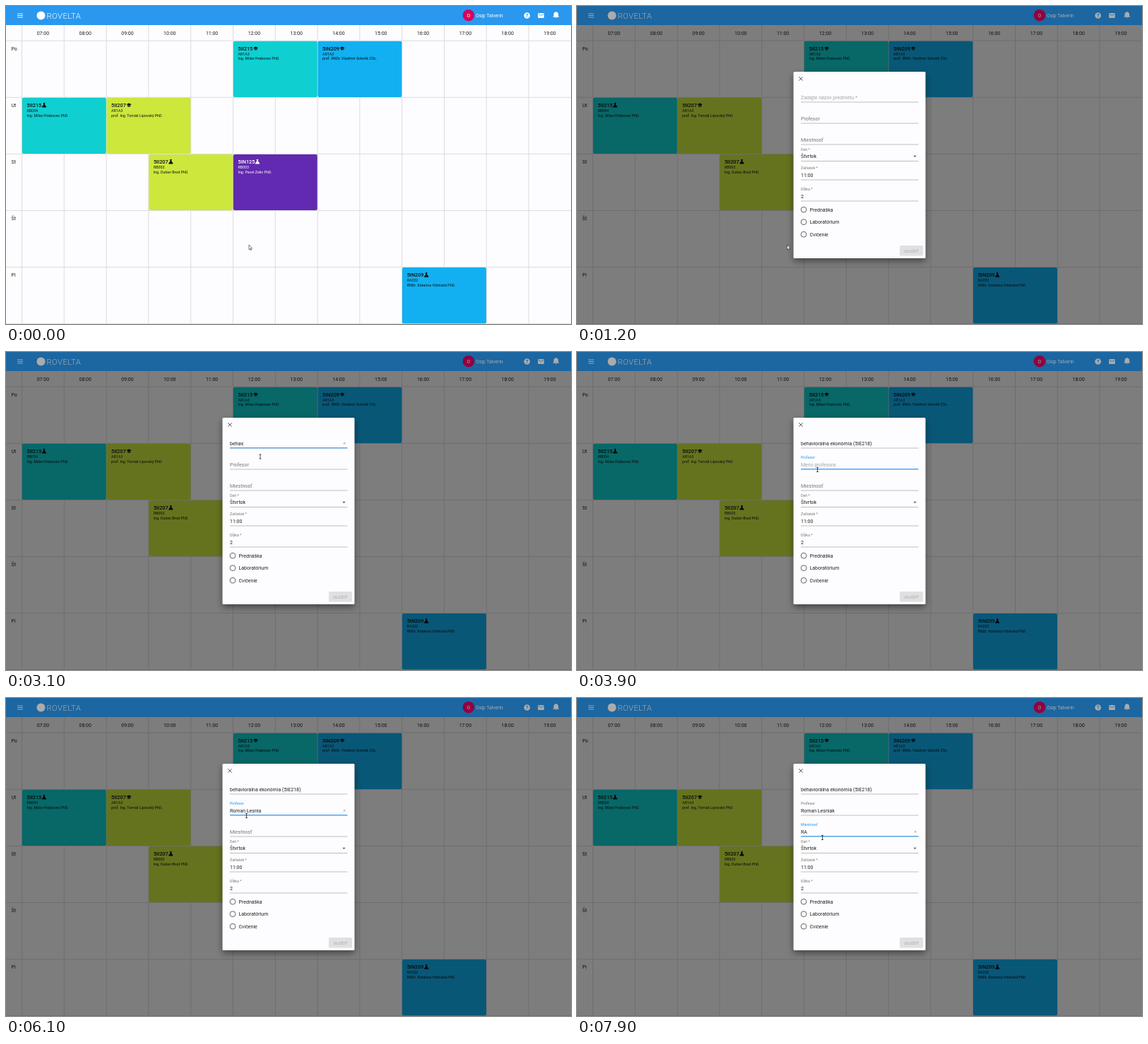
These frames come from a looping animation (800x450 px, 8 s). An HTML page:

```html
<!DOCTYPE html>
<html lang="sk">
<head>
<meta charset="utf-8">
<style>
  html, body { margin: 0; width: 100%; height: 100%; overflow: hidden; background: #fdfcfe; }
  svg { display: block; width: 800px; height: 450px; font-family: Roboto, Arial, sans-serif; }
  #dialog { filter: drop-shadow(0 4px 5px rgba(0, 0, 0, .45)); }
</style>
</head>
<body>
<svg viewBox="0 0 800 450">
  <g id="page"></g>
  <g id="dim"><path d="M0 0H800V27H0Z" opacity=".33"/><path d="M0 27H800V450H0Z" opacity=".5"/></g>
  <g id="dialog"><rect x="306.5" y="93" width="187" height="264" rx="1.5" fill="#fdfcfe"/></g>
  <g id="form"></g>
  <g id="pointer"></g>
</svg>
<script>
const LOOP = 8000, STEP = 100, OPEN = 1200;
const BLUE = '#2196f3', INK = '#212121', GREY = '#757575';
const $ = id => document.getElementById(id);

const text = (x, y, s, size = 7, fill = INK, extra = '') =>
  `<text x="${x}" y="${y}" font-size="${size}" fill="${fill}" ${extra}>${s}</text>`;
const path = (d, stroke, width = 1, fill = 'none') =>
  `<path d="${d}" stroke="${stroke}" stroke-width="${width}" fill="${fill}"/>`;
const circle = (x, y, r, fill, extra = '') =>
  `<circle cx="${x}" cy="${y}" r="${r}" fill="${fill}" ${extra}/>`;
const MIDDLE = 'text-anchor="middle"';

// Timetable
const colX = i => 22.5 + i * 59.8;
const rowY = i => 49.2 + i * 80.1;

const ICONS = {
  lecture: 'M0 2.4L3.7.7L7.4 2.4L3.7 4.1ZM1.5 3.6L3.7 4.6L5.9 3.6V5Q3.7 6.6 1.5 5Z',
  lab: 'M1.8 0H4.6V.8H4.2V2.8L6.3 5.6Q6.5 6.5 5.8 6.5H.6Q-.1 6.5.1 5.6L2.2 2.8V.8H1.8Z'
};

function card([col, row, fill, code, icon, room, teacher, ink = '#0b1418']) {
  const x = colX(col), y = rowY(row);
  const iconX = x + 7 + (code.includes('IN') ? 24.3 : 21.3);
  return `<rect x="${x + .3}" y="${y + .5}" width="119" height="79.2" rx="2" fill="${fill}"/>` +
    text(x + 7, y + 13.7, code, 7.3, ink, 'font-weight="500"') +
    `<path transform="translate(${iconX} ${y + 7.6})" d="${ICONS[icon]}" fill="${ink}"/>` +
    text(x + 7, y + 20.5, room, 5.3, ink) +
    text(x + 7, y + 27.2, teacher, 5.3, ink);
}

const CYAN = '#10cfd0', SKY = '#12b0f0', LIME = '#cde73c';
const cards = [
  [5, 0, CYAN, '5II215', 'lecture', 'AR1A3', 'Ing. Milan Hrabovec PhD.'],
  [7, 0, SKY, '5IN209', 'lecture', 'AR1A3', 'prof. RNDr. Vladimír Sokolík CSc.'],
  [0, 1, CYAN, '5II215', 'lab', 'RB054', 'Ing. Milan Hrabovec PhD.'],
  [2, 1, LIME, '5II207', 'lecture', 'AR1A3', 'prof. Ing. Tomáš Lipovský PhD.'],
  [3, 2, LIME, '5II207', 'lab', 'RB002', 'Ing. Dušan Brod PhD.'],
  [5, 2, '#622ab0', '5IN125', 'lab', 'RB003', 'Ing. Pavol Zelin PhD.', '#fff'],
  [9, 4, SKY, '5IN209', 'lab', 'RA222', 'RNDr. Katarína Vrbinská PhD.']
];

function header() {
  return '<rect width="800" height="27" fill="#2a98ef"/>' +
    path('M16 11H24M16 13.5H24M16 16H24', '#fff', .9) +
    circle(49.5, 13.5, 6, '#fff') +
    text(57.5, 17.6, 'ROVELTA', 11.3, '#fff', 'font-weight="300" letter-spacing=".4"') +
    circle(655, 13.2, 8.3, '#d8005f') +
    text(655, 15.8, 'O', 7, '#fff', MIDDLE) +
    text(665, 15.7, 'Osip Talverin', 6.8, '#fff') +
    circle(737.7, 13.5, 4.3, '#fff') +
    text(737.7, 16.1, '?', 7, '#2a98ef', MIDDLE + ' font-weight="700"') +
    '<rect x="753.2" y="10" width="8.6" height="7" rx=".8" fill="#fff"/>' +
    path('M754 11.3L757.5 13.6L761 11.3', '#2a98ef', .8) +
    path('M774.5 15.8V15.2L775.5 14.2V11.6Q775.6 9.2 778 8.6Q778.8 7.2 779.6 8.6Q782 9.2 782.1 11.6V14.2L783.1 15.2V15.8ZM777.8 16.4H779.8Q778.8 18.2 777.8 16.4Z', 'none', 0, '#fff');
}

function page() {
  let s = '<rect width="800" height="450" fill="#fdfcfe"/>', lines = '';
  for (let i = 0; i < 13; i++) {
    lines += `M${colX(i)} 27V450`;
    const hour = String(i + 7).padStart(2, '0');
    s += text(colX(i) + 29.9, 40.5, hour + ':00', 7, INK, MIDDLE);
  }
  ['Po', 'Ut', 'St', 'Št', 'Pi'].forEach((day, i) => s += text(7.5, rowY(i) + 13.7, day));
  for (let i = 0; i < 6; i++) lines += `M0 ${rowY(i)}H800`;
  return s + path(lines, '#dcdbde') + cards.map(card).join('') + header();
}

// Dialog
const clamp = v => Math.max(0, Math.min(1, v));
const ease = v => 1 - (1 - clamp(v)) ** 3;
const typed = (s, t, start, perChar) => s.slice(0, Math.max(0, Math.floor((t - start) / perChar)));

const underline = y => path(`M317 ${y}H483.5`, '#949494', .6);

// A field that is focused between two times; its label floats up when focused or filled.
function input(t, y, { label, hint = '', value, from, to, caret }) {
  const active = t >= from && t < to;
  const grow = ease((t - from + STEP) / 200);
  let s = underline(y);
  if (label) {
    const size = 7 - 1.75 * grow;
    s += text(317, y - 4.1 - 10.6 * grow, label, size, active ? BLUE : GREY);
  }
  if (value) s += text(317, y - 4.3, value);
  else if (!label || active) s += text(317, y - 4.3, hint, 7, '#a3a3a3');
  if (active) {
    s += path(`M${400.2 - 83.2 * grow} ${y - .3}H${400.2 + 83.3 * grow}`, BLUE, 1.1);
    if (value) s += path(`M477.8 ${y - 8}l2.6 2.6m0 -2.6l-2.6 2.6`, '#777', .6);
    if (caret) s += `<text x="317" y="${y - 4.3}" font-size="7"><tspan fill="none">${value}</tspan><tspan dx="-.7" font-weight="300" fill="#333">|</tspan></text>`;
  }
  return s;
}

function filled(y, label, value) {
  return underline(y) + text(317, y - 15, label, 5.25, GREY) + text(317, y - 4.5, value);
}

function form(t) {
  const picked = t >= 3200;
  let s = path('M314.2 100.2l5.4 5.4m0 -5.4l-5.4 5.4', '#444', .9);
  s += input(t, 136, {
    hint: 'Zadajte názov predmetu *', from: 2000, to: 3300, caret: !picked,
    value: picked ? 'behaviorálna ekonómia (5IE218)' : typed('behav', t, 2200, 100)
  });
  s += input(t, 166, {
    label: 'Profesor', hint: 'Meno profesora', from: 3700, to: 7200,
    value: typed('Roman Lesniak', t, 4600, 125)
  });
  s += input(t, 196, {
    label: 'Miestnosť', from: 7200, to: LOOP, value: typed('RA', t, 7600, 100)
  });
  s += filled(219.5, 'Deň *', 'Štvrtok').replace('y="204.5"', 'y="205"');
  s += path('M476.4 211.8H480.6L478.5 214Z', 'none', 0, '#555');
  s += filled(246, 'Začiatok *', '11:00') + filled(276, 'Dĺžka *', '2');
  ['Prednáška', 'Laboratórium', 'Cvičenie'].forEach((name, i) => {
    const y = 288.2 + i * 17.5;
    s += circle(321, y, 3.9, 'none', 'stroke="#555" stroke-width=".9"') + text(329.5, y + 2.4, name);
  });
  return s + '<rect x="457" y="339" width="33" height="14.5" rx="1.5" fill="#e0dfe1"/>' +
    text(473.5, 348.6, 'ULOŽIŤ', 6.2, '#b3b2b4', MIDDLE + ' font-weight="500"');
}

// Pointer: [time, x, y] stops with eased moves between them
const stops = [
  [0, 344, 338], [300, 344, 338], [800, 297.5, 338], [1300, 297.5, 338],
  [1900, 372.5, 136.5], [2700, 372.5, 136.5], [3100, 360, 148], [3300, 360, 148],
  [3700, 340.5, 166.5], [6600, 340.5, 166.5], [7100, 347.5, 197.5], [LOOP, 347.5, 197.5]
];

function pointer(t) {
  const i = stops.findIndex(p => p[0] > t);
  const [t0, x0, y0] = stops[i - 1], [t1, x1, y1] = stops[i];
  const u = (t - t0) / (t1 - t0), k = u * u * (3 - 2 * u);
  const x = x0 + (x1 - x0) * k, y = y0 + (y1 - y0) * k;
  const beam = t >= 1900;
  return `<g transform="translate(${x} ${y})">` + (beam
    ? path('M-1.5 -3H1.5M0 -3V3M-1.5 3H1.5', '#222', .8)
    : path('M0 0V6.8L1.5 5.4L2.5 7.7L3.5 7.3L2.5 5.1H4.6Z', '#222', .6, '#fff')) + '</g>';
}

$('page').innerHTML = page();
let last = -1;

function draw(now) {
  const t = Math.floor(now % LOOP / STEP) * STEP;
  if (t !== last) {
    last = t;
    const open = t >= OPEN;
    $('dim').style.display = $('dialog').style.display = open ? '' : 'none';
    $('form').innerHTML = open ? form(t) : '';
    $('pointer').innerHTML = pointer(t);
  }
  requestAnimationFrame(draw);
}
draw(performance.now());
</script>
</body>
</html>
```
